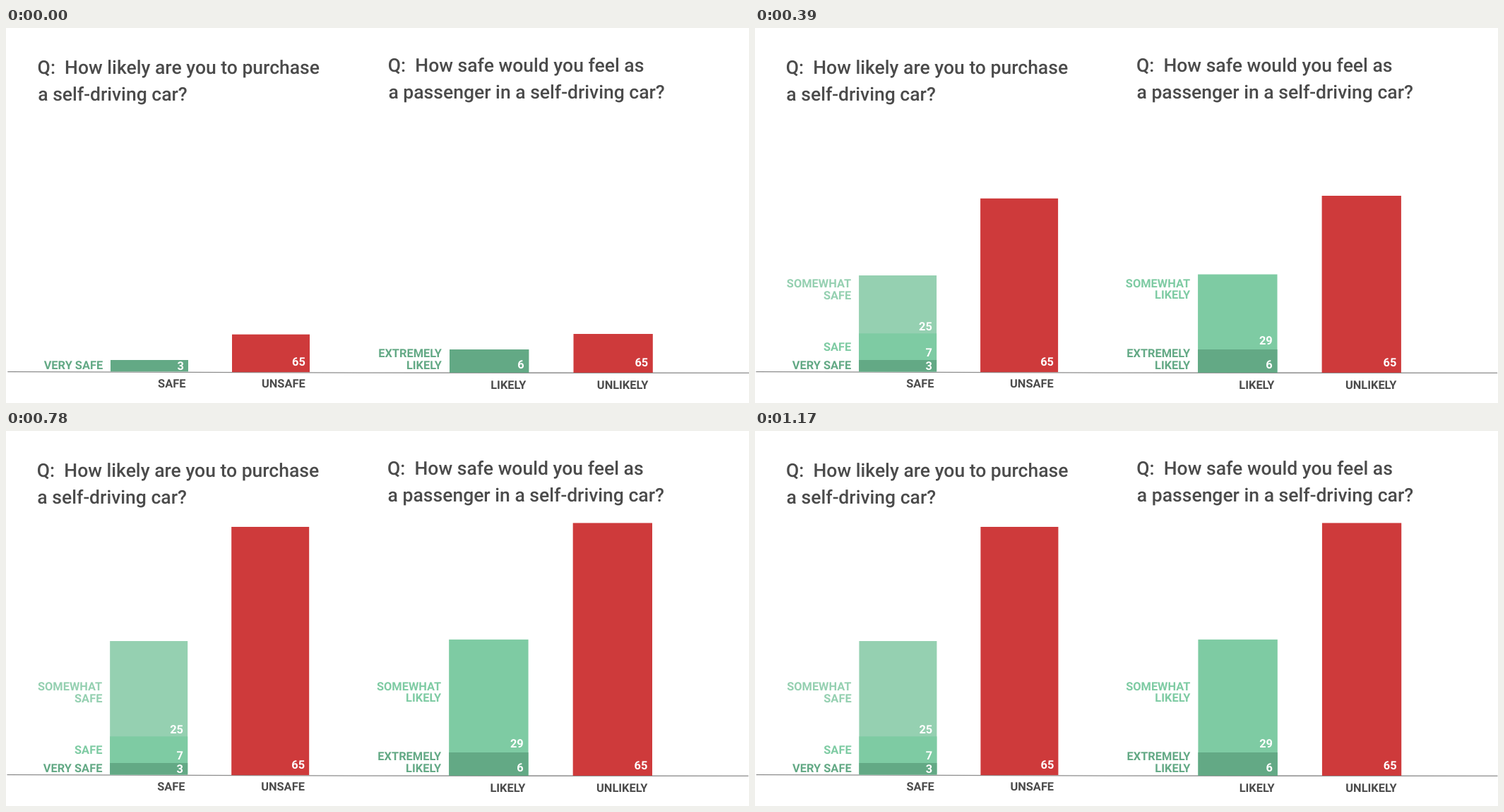
Write an HTML page that moves like this. It is 1052 px wide and 532 px high and loops after 1300 ms.

```html
<!DOCTYPE html>
<html lang="en">
<head>
<meta charset="utf-8">
<title>Self-driving car survey</title>
<style>
html, body { margin: 0; width: 100%; height: 100%; overflow: hidden; background: #fff; }
svg { display: block; width: 1052px; height: 532px; }
text { font-family: Roboto, Arial, sans-serif; font-size: 16.4px; font-weight: 700; text-anchor: end; text-rendering: geometricPrecision; }
.title { font-size: 26.5px; font-weight: 500; text-anchor: start; white-space: pre; }
</style>
</head>
<body>
<svg viewBox="0 0 1052 532"><g id="stage"></g></svg>
<script>
const STEP = 130, STEPS = 10;
const INK = '#4b4b4b', RED = '#ce3a3b', DEEP = '#63a985', MID = '#7ecba3', PALE = '#95d0b1';
const stage = document.getElementById('stage');

function add(tag, attrs, content) {
  const el = document.createElementNS('http://www.w3.org/2000/svg', tag);
  for (const key in attrs) el.setAttribute(key, attrs[key]);
  if (content) el.textContent = content;
  stage.appendChild(el);
  return el;
}

// Parts that only show from a given step on.
const timed = [];
function text(x, y, content, fill, from = 0) {
  timed.push({ el: add('text', { x, y, fill }, content), from });
}
function title(x, y, content) {
  add('text', { x, y, fill: INK, class: 'title' }, content);
}

// Bars whose top edge climbs; the last value holds.
const bars = [];
function bar(x, width, bottom, fill, tops, from = 0) {
  bars.push({ el: add('rect', { x, width, fill }), bottom, tops, from });
}

title(44.6, 65.3, 'Q:\u00a0 How likely are you to purchase');
title(45.2, 102.6, 'a self-driving car?');
title(540.8, 62.3, 'Q:\u00a0 How safe would you feel as');
title(541.4, 99.6, 'a passenger in a self-driving car?');

add('polyline', {
  points: '2.3,487.7 250,488.4 500,489.2 1052,489.3',
  fill: 'none', stroke: '#8c8c8c', 'stroke-width': 1.3
});

bar(148, 110, 487.4, PALE, [393, 351, 321, 298], 2);
bar(148, 110, 487.4, MID, [433.3], 1);
bar(148, 110, 487.4, DEEP, [471]);
bar(320, 110, 488.2, RED, [434.7, 379.6, 298.6, 241.8, 188, 136]);
bar(628, 112.4, 489, MID, [419.6, 384.7, 349.5, 321, 295.8], 1);
bar(628, 112.4, 489, DEEP, [456]);
bar(803.5, 112.3, 489, RED, [434, 378, 295.7, 238, 183, 130.5]);

text(137.2, 484, 'VERY SAFE', DEEP);
text(137.2, 457.5, 'SAFE', MID, 1);
text(137, 368.4, 'SOMEWHAT', PALE, 3);
text(137.2, 384.6, 'SAFE', PALE, 3);
text(617, 467.3, 'EXTREMELY', DEEP);
text(617, 483.8, 'LIKELY', DEEP);
text(617, 367.9, 'SOMEWHAT', MID, 3);
text(617, 384.2, 'LIKELY', MID, 3);

text(251.8, 485.3, '3', '#fff');
text(251.8, 466.3, '7', '#fff', 1);
text(251.8, 429.4, '25', '#fff', 2);
text(423.9, 478.8, '65', '#fff');
text(733.6, 482.9, '6', '#fff');
text(733.6, 449, '29', '#fff', 1);
text(909.2, 480.3, '65', '#fff');

text(254.4, 510.4, 'SAFE', INK);
text(423.7, 510.4, 'UNSAFE', INK);
text(736.3, 512.4, 'LIKELY', INK);
text(909.3, 512.4, 'UNLIKELY', INK);

// The whole sheet slips left, then eases slowly back.
function drift(step) {
  if (step < 3) return 0;
  return -0.9 + 0.08 * Math.max(0, step - 5);
}

function draw(time) {
  const step = Math.floor(time / STEP) % STEPS;
  stage.setAttribute('transform', `translate(${drift(step)} 0)`);
  for (const { el, from } of timed) {
    el.setAttribute('visibility', step < from ? 'hidden' : 'visible');
  }
  for (const { el, bottom, tops, from } of bars) {
    const i = step - from;
    const top = i < 0 ? bottom : tops[Math.min(i, tops.length - 1)];
    el.setAttribute('y', top);
    el.setAttribute('height', bottom - top);
  }
}

let start;
function tick(now) {
  if (start === undefined) start = now;
  draw(now - start);
  requestAnimationFrame(tick);
}
draw(0);
requestAnimationFrame(tick);
</script>
</body>
</html>
```
